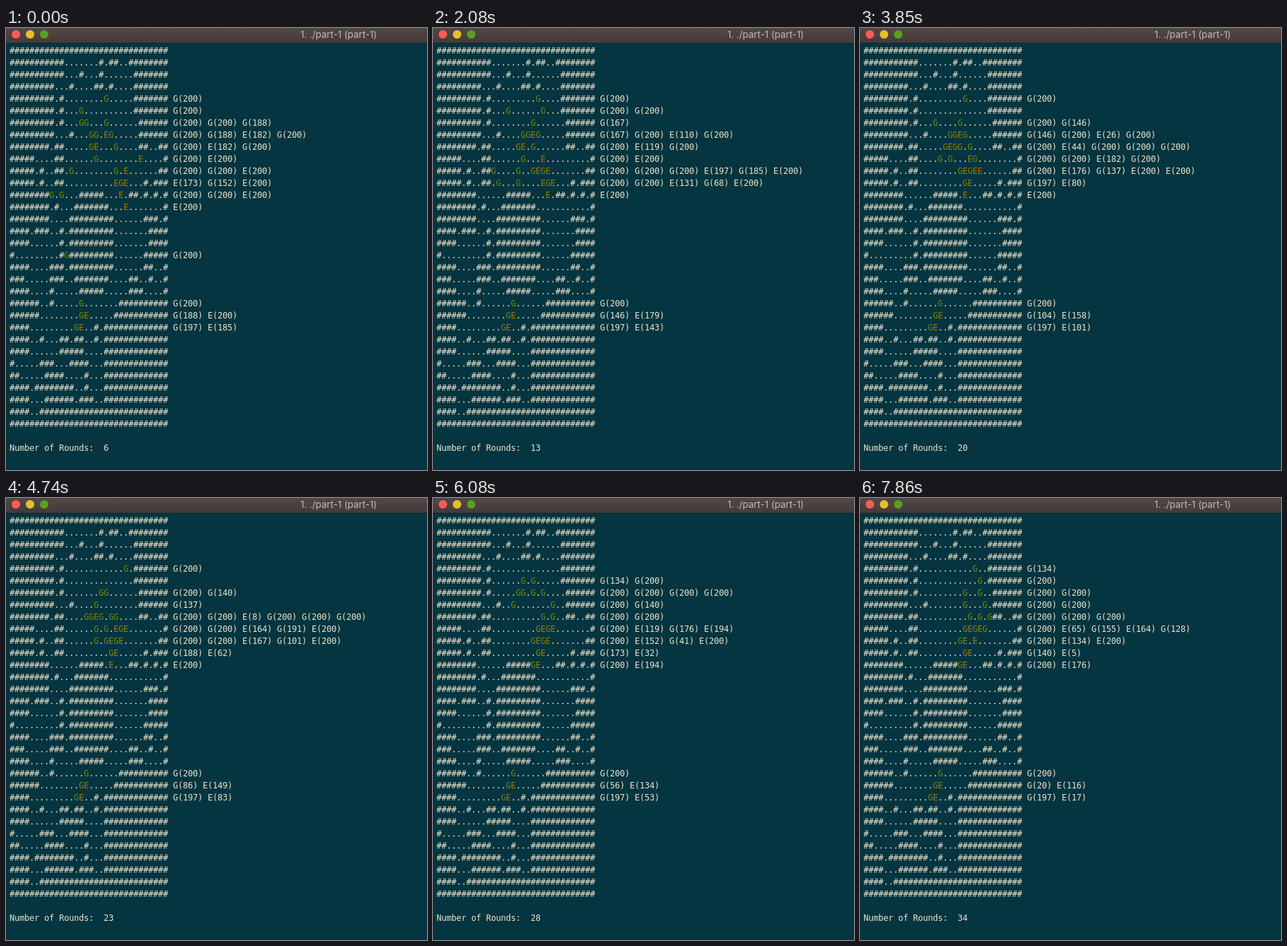
Write an HTML page with a canvas that moves like this. It is 595 px wide and 624 px high and loops after 8000 ms.

```html
<!DOCTYPE html>
<html lang="en">
<head>
<meta charset="utf-8">
<title>Goblins and elves</title>
<style>
html, body { margin: 0; width: 100%; height: 100%; overflow: hidden; background: #053540; }
canvas { display: block; }
</style>
</head>
<body>
<canvas id="stage" width="595" height="624"></canvas>
<script>
const start = `
################################
###########.......#.##..########
###########...#...#......#######
#########...#....##.#....#######
#########.#........G.....#######
#########.#...G..........#######
#########.#...GG...G......######
#########...#...GG.EG.....######
########.##.....GE...G....##..##
#####....##......G........E....#
#####.#..##.G........G.E......##
#####.#..##..........EGE...#.###
########G.G...#####...E.##.#.#.#
########.#...#######...E.......#
########....#########......###.#
####.###..#.#########.......####
####......#.#########.......####
#.........#G#########......#####
####....###.#########......##..#
###.....###..#######....##..#..#
####....#.....#####.....###....#
######..#.....G.......##########
######........GE.....###########
####.........GE..#.#############
####..#...##.##..#.#############
####......#####....#############
#.....###...####...#############
##.....####....#...#############
####.########..#...#############
####...######.###..#############
####..##########################
################################`.replace(/\n/g, '');

const W = 32, LOOP = 8000, FIRST_ROUND = 6;
const wounded = {
  '19,6': 188, '17,7': 188, '19,7': 182, '17,8': 182, '21,11': 173,
  '22,11': 152, '14,22': 188, '13,23': 197, '14,23': 185
};
const changes = [450, 740, 1040, 1190, 1490, 1790, 2080, 2380, 2520, 2820, 3110, 3410, 3560, 3850,
  4150, 4450, 4740, 4890, 5190, 5480, 5780, 6080, 6380, 6670, 6820, 7110, 7560, 7860];

// Cells are numbered in reading order, and so are the four neighbours.
const cave = start.replace(/[GE]/g, '.');
const around = cell => [cell - W, cell - 1, cell + 1, cell + W];
let units = [];
[...start].forEach((kind, cell) => {
  if (kind === 'G' || kind === 'E')
    units.push({ kind, cell, hp: wounded[`${cell % W},${cell / W | 0}`] || 200 });
});

const unitAt = cell => units.find(u => u.cell === cell);
const isFree = cell => cave[cell] === '.' && !unitAt(cell);

function distances(from) {
  const dist = new Map([[from, 0]]);
  for (const cell of dist.keys())
    for (const next of around(cell))
      if (!dist.has(next) && isFree(next)) dist.set(next, dist.get(cell) + 1);
  return dist;
}

function foesInReach(unit) {
  return around(unit.cell).map(unitAt).filter(u => u && u.kind !== unit.kind);
}

function move(unit) {
  const dist = distances(unit.cell);
  const goals = units.filter(u => u.kind !== unit.kind)
    .flatMap(u => around(u.cell))
    .filter(cell => isFree(cell) && dist.has(cell))
    .sort((a, b) => dist.get(a) - dist.get(b) || a - b);
  if (!goals.length) return;
  const back = distances(goals[0]);
  unit.cell = around(unit.cell).find(c => isFree(c) && back.get(c) === dist.get(goals[0]) - 1);
}

function attack(unit) {
  const foe = foesInReach(unit).sort((a, b) => a.hp - b.hp)[0];
  if (!foe) return;
  foe.hp -= 3;
  if (foe.hp <= 0) units = units.filter(u => u !== foe);
}

const inOrder = () => [...units].sort((a, b) => a.cell - b.cell);

function playRound() {
  for (const unit of inOrder()) {
    if (unit.hp <= 0) continue;
    if (!foesInReach(unit).length) move(unit);
    attack(unit);
  }
}

const snapshot = () => inOrder().map(u => ({ ...u }));
const history = [snapshot()];
for (const _ of changes) {
  playRound();
  history.push(snapshot());
}

const ctx = document.getElementById('stage').getContext('2d');
const colors = { text: '#eae3cb', G: '#728a05', E: '#a57705' };

function print(text, col, row, color = colors.text) {
  ctx.fillStyle = color;
  [...text].forEach((ch, i) => ctx.fillText(ch, 5 + 7 * (col + i), 36 + 17 * row));
}

function drawWindow() {
  ctx.fillStyle = '#053540';
  ctx.fillRect(0, 0, 595, 624);
  const bar = ctx.createLinearGradient(0, 0, 0, 21);
  bar.addColorStop(0, '#524846');
  bar.addColorStop(1, '#433a39');
  ctx.fillStyle = bar;
  ctx.fillRect(0, 0, 595, 21);
  ctx.fillStyle = '#0b2a32';
  ctx.fillRect(0, 21, 595, 1);
  ctx.fillRect(0, 21, 1, 603);
  ['#fc5b57', '#e5bf2c', '#5a9f22'].forEach((color, i) => {
    ctx.fillStyle = color;
    ctx.beginPath();
    ctx.arc(14 + 20 * i, 9, 6, 0, 7);
    ctx.fill();
  });
  ctx.font = '13.3px Inter, sans-serif';
  ctx.fillStyle = '#c2bab8';
  ctx.fillText('1. ./part-1 (part-1)', 416, 14);
}

function drawRound(index) {
  drawWindow();
  ctx.font = '12px "DejaVu Sans Mono", monospace';
  const army = history[index];
  for (let row = 0; row < cave.length / W; row++) {
    const line = army.filter(u => (u.cell / W | 0) === row);
    const ground = [...cave.slice(row * W, row * W + W)];
    for (const u of line) {
      ground[u.cell % W] = ' ';
      print(u.kind, u.cell % W, row, colors[u.kind]);
    }
    print(ground.join(''), 0, row);
    print(line.map(u => `${u.kind}(${u.hp})`).join(' '), W + 1, row);
  }
  print(`Number of Rounds:  ${FIRST_ROUND + index}`, 0, 33);
}

let shown = -1;
function tick() {
  const t = performance.now() % LOOP;
  const index = changes.filter(at => at <= t).length;
  if (index !== shown) drawRound(shown = index);
  requestAnimationFrame(tick);
}
tick();
</script>
</body>
</html>
```
